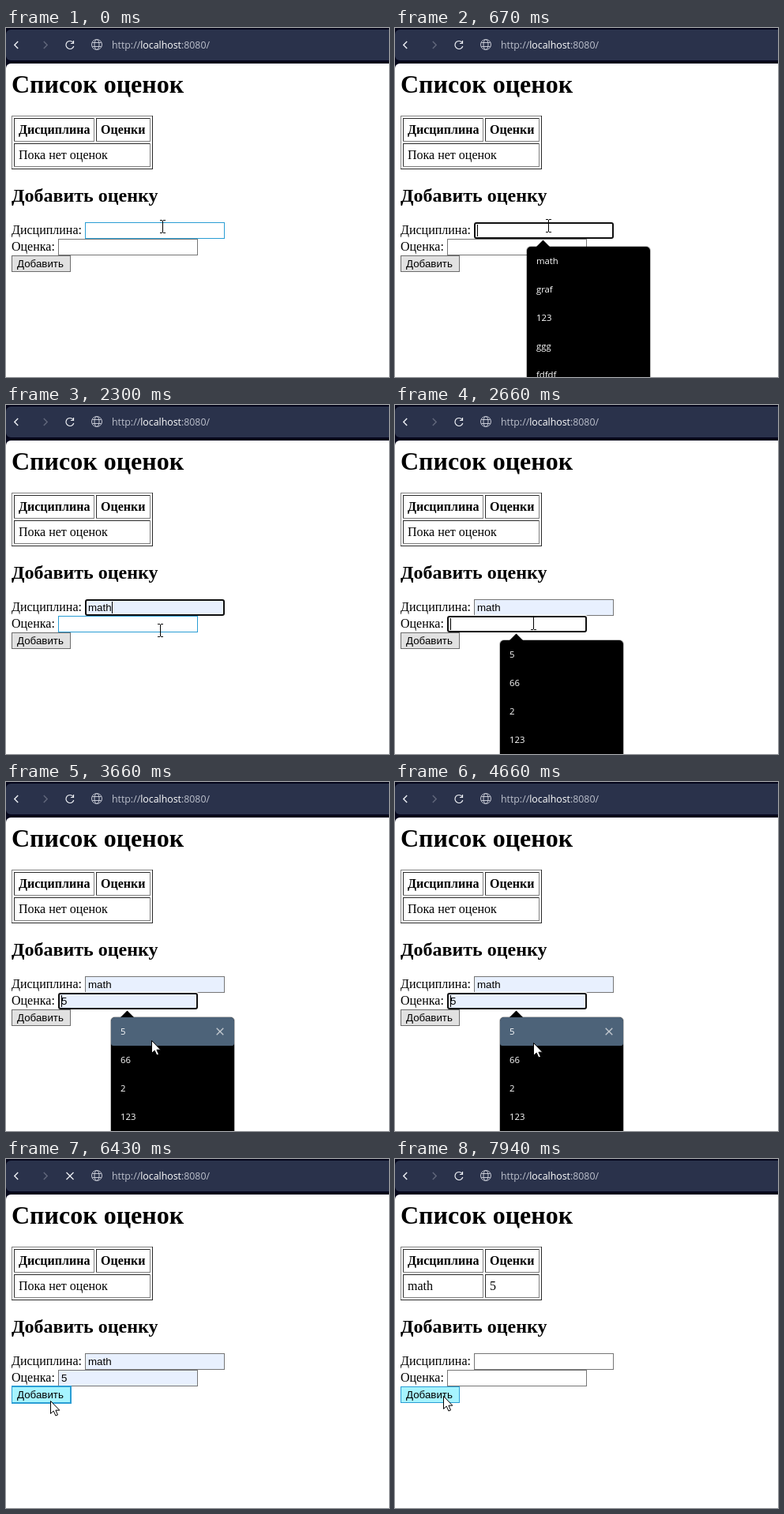
An HTML page with a canvas that plays this animation: 485 px wide and 442 px high, repeating every 8 s.

```html
<!DOCTYPE html>
<html lang="ru">
<head>
<meta charset="utf-8">
<style>
  html, body { margin: 0; width: 100%; height: 100%; overflow: hidden; background: #fff; }
  canvas { display: block; }
</style>
</head>
<body>
<canvas id="stage" width="485" height="442"></canvas>
<script>
const ctx = document.getElementById('stage').getContext('2d');
const LOOP = 8000, STEP = 120;
const SERIF = '"Liberation Serif", "Times New Roman", serif';
const SANS = '"Liberation Sans", Arial, sans-serif';
const UI = '"Open Sans", "Noto Sans", sans-serif';
const GREY = '#767676', DARK = '#2c2c2c', BLUE = '#2a9dd4', ICON = '#eef0f5';

// Each move glides to its end point in even steps
const START = { x: 198, y: 251 };
const MOVES = [
  { at: 120, steps: 1, x: 194, y: 250 },
  { at: 1190, steps: 5, x: 205, y: 290 },
  { at: 2300, steps: 3, x: 175, y: 276 },
  { at: 3180, steps: 5, x: 184, y: 327 },
  { at: 3780, steps: 2, x: 187, y: 358 },
  { at: 4170, steps: 3, x: 175, y: 330 },
  { at: 5290, steps: 2, x: 77, y: 317 },
  { at: 5550, steps: 3, x: 56, y: 306 },
  { at: 7940, steps: 1, x: 61, y: 300 }
];

const SENT = 6040, LOADING = 6430, LOADED = 6680;
const FIELDS = [
  { label: 'Дисциплина:', x: 100, open: 670, pick: 2050, blur: 2660, items: ['math', 'graf', '123', 'ggg', 'fdfdf'] },
  { label: 'Оценка:', x: 66, open: 2660, pick: 4910, blur: SENT, items: ['5', '66', '2', '123'] }
];
const FORM_Y = 246, LINE = 21, FIELD_W = 177, MENU_W = 156, ROW = 36;
FIELDS.forEach((f, i) => {
  f.y = FORM_Y + i * LINE;
  f.menuX = f.x + 67;
  f.menuY = f.y + 31;
});
const BUTTON = { x: 7, y: FORM_Y + 2 * LINE, w: 75, h: LINE };

const within = (t, a, b) => t >= a && t < b;
const inside = (p, x, y, w, h) => p.x >= x && p.x < x + w && p.y >= y && p.y < y + h;

function rect(x, y, w, h, color) {
  ctx.fillStyle = color;
  ctx.fillRect(x, y, w, h);
}

function round(x, y, w, h, r, color) {
  ctx.fillStyle = color;
  ctx.beginPath();
  ctx.roundRect(x, y, w, h, r);
  ctx.fill();
}

function text(str, x, y, font, color = '#000') {
  ctx.font = font;
  ctx.fillStyle = color;
  ctx.fillText(str, x, y);
  return x + ctx.measureText(str).width;
}

function line(points, color, width) {
  ctx.strokeStyle = color;
  ctx.lineWidth = width;
  ctx.beginPath();
  points.forEach(([x, y]) => ctx.lineTo(x, y));
  ctx.stroke();
}

function oval(x, y, rx, ry, color, width, from = 0, to = Math.PI * 2) {
  ctx.strokeStyle = color;
  ctx.lineWidth = width;
  ctx.beginPath();
  ctx.ellipse(x, y, rx, ry, 0, from, to);
  ctx.stroke();
}

function chevron(x, y, dir, color) {
  line([[x - dir * 2.2, y - 4.5], [x + dir * 2.2, y], [x - dir * 2.2, y + 4.5]], color, 1.4);
}

function cross(x, y, r, color) {
  for (const s of [-1, 1]) line([[x - r, y - s * r], [x + r, y + s * r]], color, 1.3);
}

function box(x, y, w, h, topLeft, bottomRight = topLeft) {
  rect(x, y, w, 1, topLeft);
  rect(x, y, 1, h, topLeft);
  rect(x, y + h - 1, w, 1, bottomRight);
  rect(x + w - 1, y, 1, h, bottomRight);
}

function toolbar(loading) {
  rect(0, 0, 485, 52, '#04051a');
  round(0, 2, 495, 39, 6, '#2a324b');
  chevron(13, 21.5, -1, ICON);
  chevron(50, 21.5, 1, '#62687c');
  if (loading) {
    cross(81, 21.5, 4.5, ICON);
  } else {
    oval(81, 21.5, 5, 5, ICON, 1.2, 0.3, Math.PI * 1.8);
    line([[85.5, 16], [85.5, 19.5], [82, 19.5]], ICON, 1.2);
  }
  for (const rx of [6.5, 3]) oval(115, 21, rx, 6.5, '#c5c8d3', 1);
  for (const y of [18.5, 23.5]) line([[109.3, y], [120.7, y]], '#c5c8d3', 1);
  const font = '12.35px ' + UI, dim = '#bcc0cc';
  let x = text('http://', 134, 26, font, dim);
  x = text('localhost', x, 26, '500 ' + font, '#fff');
  text(':8080/', x, 26, font, dim);
}

function cell(x, y, w, label, weight = '') {
  box(x, y, w, 30, DARK, '#808080');
  text(label, x + 6, y + 20, weight + ' 16px ' + SERIF);
}

function page(loaded) {
  round(0, 45, 495, 410, [6, 0, 0, 0], '#fff');
  text('Список оценок', 7, 82, 'bold 32px ' + SERIF);
  box(7, 111, 179, 68, '#808080', DARK);
  cell(10, 114, 102, 'Дисциплина', 'bold');
  cell(114, 114, 69, 'Оценки', 'bold');
  if (loaded) {
    cell(10, 146, 102, 'math');
    cell(114, 146, 69, '5');
  } else {
    cell(10, 146, 173, 'Пока нет оценок');
  }
  text('Добавить оценку', 7, 220, 'bold 24px ' + SERIF);
}

function hoveredRow(f, t, p) {
  const over = within(t, f.open, f.pick) && inside(p, f.menuX, f.menuY, MENU_W, f.items.length * ROW);
  return over ? Math.floor((p.y - f.menuY) / ROW) : -1;
}

function caretOn(t) {
  return !within(t, 4410, 4660) && !within(t, 5550, SENT);
}

function field(f, t, p) {
  const { x, y } = f;
  const row = hoveredRow(f, t, p);
  const picked = within(t, f.pick, LOADED);
  const value = picked ? f.items[0] : row >= 0 ? f.items[row] : '';
  const focused = within(t, f.open, f.blur);
  const fill = value ? '#e8f0fe' : '#fff';
  text(f.label, 7, y + 15, '16px ' + SERIF);
  if (focused) {
    round(x - 1, y - 1, FIELD_W + 2, LINE + 2, 3, '#fff');
    round(x, y, FIELD_W, LINE, 3, '#101010');
    round(x + 2, y + 2, FIELD_W - 4, LINE - 4, 1, fill);
  } else {
    rect(x, y, FIELD_W, LINE, fill);
    box(x, y, FIELD_W, LINE, inside(p, x, y, FIELD_W, LINE) ? BLUE : GREY);
  }
  const end = text(value, x + 4, y + 15, '13.333px ' + SANS);
  if (focused && caretOn(t)) rect(picked ? Math.round(end) : x + 4, y + 3, 1, 15, '#000');
}

function button(t, p) {
  const { x, y, w, h } = BUTTON;
  const hover = inside(p, x, y, w, h);
  const edge = hover ? BLUE : '#6c6c6c';
  rect(x, y, w, h, within(t, SENT, LOADING) ? '#86e4f4' : hover ? '#a6f4ff' : '#e1e1e1');
  box(x, y, w, h, edge);
  if (within(t, SENT, LOADED)) box(x, y - 1, w + 1, h + 2, edge);
  text('Добавить', x + 7, y + 15, '13.333px ' + SANS);
}

function menu(f, t, p) {
  if (!within(t, f.open, f.pick)) return;
  const { menuX: x, menuY: y } = f;
  const row = hoveredRow(f, t, p);
  ctx.fillStyle = '#000';
  ctx.beginPath();
  for (const [dx, dy] of [[-9.5, 1], [0, -8.5], [9.5, 1]]) ctx.lineTo(x + 20.5 + dx, y + dy);
  ctx.fill();
  round(x - 1, y - 1, MENU_W + 2, 200, 6, 'rgba(0, 0, 0, 0.25)');
  round(x, y, MENU_W, 200, 5, '#000');
  if (row >= 0) {
    const top = y + row * ROW;
    round(x, top, MENU_W, ROW, row ? 3 : [5, 5, 3, 3], '#4d6379');
    cross(x + 138, top + 18, 4.3, '#c3c9d0');
  }
  f.items.forEach((item, i) => text(item, x + 12, y + 22 + i * ROW, '500 11.3px ' + UI, '#fff'));
}

function beam({ x, y }) {
  rect(x, y - 7, 1, 15, '#000');
  for (const end of [y - 8, y + 8]) {
    rect(x - 3, end, 3, 1, '#000');
    rect(x + 1, end, 3, 1, '#000');
  }
}

function arrow({ x, y }) {
  const shape = [[0, 0], [0, 16], [3.7, 12.6], [6.4, 18.6], [9, 17.5], [6.4, 11.7], [11.3, 11.7]];
  ctx.beginPath();
  shape.forEach(([dx, dy]) => ctx.lineTo(x + 0.5 + dx, y + 0.5 + dy));
  ctx.closePath();
  ctx.fillStyle = '#fff';
  ctx.fill();
  ctx.strokeStyle = '#000';
  ctx.lineWidth = 1;
  ctx.stroke();
}

function pointerAt(t) {
  let { x, y } = START;
  for (const m of MOVES) {
    if (t < m.at) break;
    const k = Math.min(1, (Math.floor((t - m.at) / STEP) + 1) / m.steps);
    x += (m.x - x) * k;
    y += (m.y - y) * k;
  }
  return { x: Math.round(x), y: Math.round(y) };
}

function draw(t) {
  const p = pointerAt(t);
  toolbar(within(t, LOADING, LOADED));
  page(t >= LOADED);
  FIELDS.forEach(f => field(f, t, p));
  button(t, p);
  FIELDS.forEach(f => menu(f, t, p));
  const overMenu = FIELDS.some(f => hoveredRow(f, t, p) >= 0);
  const overField = FIELDS.some(f => inside(p, f.x, f.y, FIELD_W, LINE));
  (overField && !overMenu ? beam : arrow)(p);
}

function tick() {
  draw(performance.now() % LOOP);
  requestAnimationFrame(tick);
}
tick();
</script>
</body>
</html>
```
